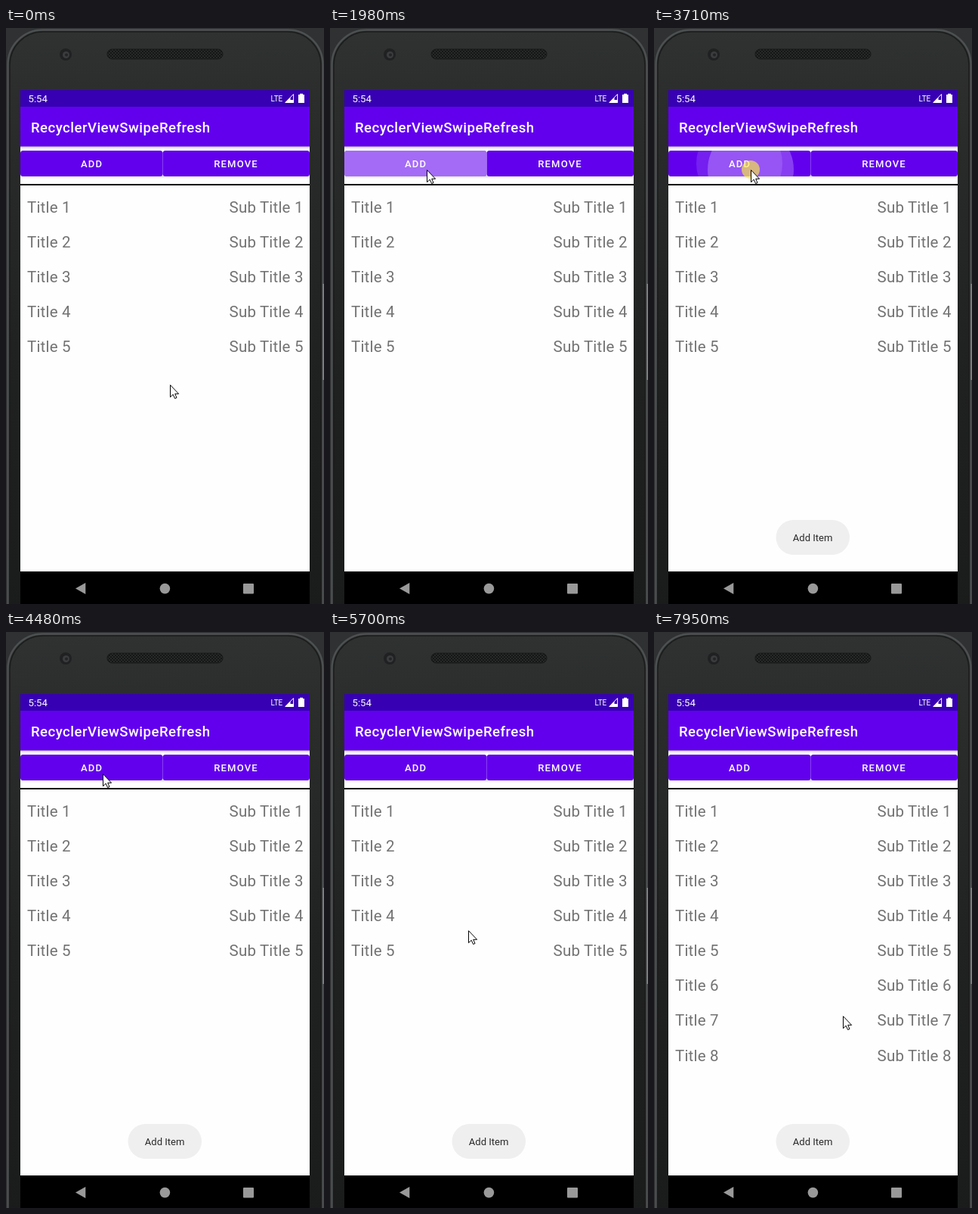
An HTML page for the animation above (8 s loop, 421 px wide and 761 px high).

```html
<!DOCTYPE html>
<html lang="en">
<head>
<meta charset="utf-8">
<title>Swipe refresh demo</title>
<style>
  html, body { margin: 0; width: 100%; height: 100%; overflow: hidden; background: #2f3133; }
  svg { display: block; width: 421px; height: 761px; font-family: Roboto, sans-serif; }
  .row text { font-size: 20.5px; letter-spacing: .18px; fill: #737373; }
  .end { text-anchor: end; }
  .medium { font-weight: 500; fill: #fff; }
  .bar { font-size: 18.64px; letter-spacing: .44px; }
  .label { font-size: 13.05px; letter-spacing: 1.165px; }
</style>
</head>
<body>
<svg viewBox="0 0 421 761">
  <defs>
    <linearGradient id="body" x2="0" y2="1">
      <stop stop-color="#303232"/><stop offset=".12" stop-color="#2b2c2c"/>
      <stop offset=".5" stop-color="#202121"/><stop offset="1" stop-color="#191a1a"/>
    </linearGradient>
    <linearGradient id="shade" x2="0" y2="1">
      <stop stop-color="#000" stop-opacity=".24"/><stop offset="1" stop-color="#000" stop-opacity="0"/>
    </linearGradient>
    <pattern id="mesh" width="4" height="4" patternUnits="userSpaceOnUse">
      <rect width="4" height="4" fill="#151616"/>
      <circle cx="1" cy="1" r=".9" fill="#303131"/><circle cx="3" cy="3" r=".9" fill="#303131"/>
    </pattern>
    <clipPath id="addClip"><rect x="19" y="162" width="188.5" height="34" rx="3.5"/></clipPath>
    <clipPath id="listClip"><rect x="19" y="208" width="383" height="510"/></clipPath>
    <filter id="soft" x="-30%" y="-30%" width="160%" height="160%">
      <feDropShadow dx="0" dy="1" stdDeviation="1.6" flood-opacity=".28"/>
    </filter>
  </defs>

  <rect width="421" height="761" fill="#2f3133"/>
  <rect x="2.5" y="2.5" width="417" height="830" rx="46" fill="url(#body)" stroke="#4d5051" stroke-width="2.5"/>
  <rect x="5" y="5" width="412" height="830" rx="44" fill="none" stroke="#1c1d1d" stroke-width="1.5"/>
  <rect x="419.5" y="338" width="2" height="127" fill="#85888a"/>
  <rect x="134" y="28" width="153" height="13" rx="6.5" fill="url(#mesh)" stroke="#171818"/>
  <circle cx="79" cy="35" r="8" fill="#202122"/>
  <circle cx="79.5" cy="35.5" r="4.5" fill="#3a3c3d"/>
  <circle cx="80" cy="35.5" r="2" fill="#222425"/>

  <rect x="19" y="82" width="383" height="636" fill="#fefefe"/>
  <rect x="19" y="156" width="383" height="4" fill="url(#shade)"/>
  <rect x="19" y="104" width="383" height="52.5" fill="#6200ee"/>
  <rect x="19" y="82" width="383" height="22" fill="#3700b3"/>
  <text x="29.5" y="98.2" font-size="13.2" fill="#fff">5:54</text>
  <text x="350.6" y="96.8" font-size="10" fill="#fff">LTE</text>
  <path d="M369.8 98.5L380.6 87.5V98.5Z" fill="none" stroke="#fff"/>
  <path d="M369.5 98.8L376.5 91.7V98.8ZM376 95H381V98.8H376Z" fill="#fff"/>
  <path d="M389 86.8H393V88H395V99H387V88H389Z" fill="#fff"/>
  <text x="33" y="137.8" class="medium bar">RecyclerViewSwipeRefresh</text>

  <rect x="20" y="195" width="381" height="4" fill="url(#shade)" opacity=".7"/>
  <rect x="19" y="162" width="188.5" height="34" rx="3.5" fill="#6200ee"/>
  <rect x="207.5" y="162" width="194.5" height="34" rx="3.5" fill="#6200ee"/>
  <g clip-path="url(#addClip)" fill="#fff">
    <circle id="rippleLate" cx="113" cy="179"/>
    <circle id="ripple" cx="128" cy="187"/>
  </g>
  <text x="98.9" y="184" class="medium label">ADD</text>
  <text x="275.2" y="184" class="medium label">REMOVE</text>
  <rect x="19" y="206" width="383" height="2" fill="#0a0a0a"/>

  <g id="list"></g>

  <g clip-path="url(#listClip)">
    <g id="spinner">
      <circle r="19" fill="#fafafa" filter="url(#soft)"/>
      <path id="arc" d="M0 -8.2A8.2 8.2 0 1 1 -8.2 0" fill="none" stroke="#000" stroke-width="2.7"/>
    </g>
  </g>

  <g id="toast">
    <rect x="161.5" y="650" width="97.5" height="46" rx="23" fill="#efefef"/>
    <text x="183.8" y="678.2" font-size="13.05" fill="#2b2b2b">Add Item</text>
  </g>

  <rect x="19" y="718" width="383" height="43"/>
  <g fill="#999">
    <path d="M92 740.5L105.3 733V748Z"/>
    <circle cx="210.4" cy="740.6" r="6.8"/>
    <rect x="314" y="734" width="14" height="13.5" rx="1"/>
  </g>

  <circle id="press" r="12" fill="#fff03c" opacity=".63"/>
  <path id="cursor" d="M.5 .7V16.7L4.2 13.2L6.6 18.5L9 17.5L6.7 12.3H11.6Z" fill="#fff" stroke="#000"/>
</svg>
<script>
const LOOP = 8000, TICK = 68.2;
const el = id => document.getElementById(id);
const set = (id, attrs) => { for (const k in attrs) el(id).setAttribute(k, attrs[k]); };
const clamp = x => Math.max(0, Math.min(1, x));
const smooth = x => x * x * (3 - 2 * x);
const lerp = (a, b, p) => a + (b - a) * p;

// The screen updates in ticks, counted from the start of each action.
const ticks = (t, start) => Math.floor((t - start) / TICK);
const progress = (t, start, n) => clamp((ticks(t, start) + 1) / n);

// start, number of ticks, x, y
const moves = [
  [1080, 7, 128, 187],
  [5355, 6, 183, 394],
  [5970, 7, 239, 338],
  [6670, 6, 241, 560],
  [7140, 2, 241, 552],
  [7880, 2, 250, 507]
];
const clicks = [1770, 3710, 5010];
const drag = [6600, 7010];

for (let i = 1; i <= 8; i++) {
  const y = 243.8 + (i - 1) * 46.1;
  el('list').insertAdjacentHTML('beforeend',
    `<g class="row"><text x="28" y="${y}">Title ${i}</text>` +
    `<text x="393.6" y="${y}" class="end">Sub Title ${i}</text></g>`);
}
const newRows = [...el('list').children].slice(5);

function cursorAt(t) {
  let x = 217, y = 471;
  for (const [start, n, tx, ty] of moves) {
    const p = smooth(progress(t, start, n));
    x = lerp(x, tx, p);
    y = lerp(y, ty, p);
  }
  return [x, y];
}

function drawRipple(k) {
  const spread = clamp(k / 3), fade = clamp((7 - k) / 4);
  const on = k >= 0 && k < 7;
  set('ripple', { r: lerp(57, 130, spread), opacity: on ? lerp(.24, .42, spread) * fade : 0 });
  set('rippleLate', { r: lerp(57, 130, spread), opacity: on ? .12 * (1 - spread) : 0 });
}

function toastAlpha(t) {
  // Queued toasts cross-fade, which dips the combined opacity.
  const dip = start => { const p = progress(t, start, 7); return p * (1 - p); };
  return progress(t, 2043, 8) * (1 - dip(3780) - dip(5970));
}

function drawSpinner(t) {
  const pull = smooth(progress(t, 6670, 5));
  const settle = smooth(progress(t, 6940, 3));
  const scale = 1 - progress(t, 7145, 4);
  const y = lerp(lerp(188, 302, pull), 254, settle);
  set('spinner', { transform: `translate(210.3 ${y}) scale(${scale})` });
  set('arc', {
    transform: `rotate(${ticks(t, 7075) * 24})`,
    opacity: lerp(.35, 1, pull)
  });
  el('spinner').style.display = t >= 6670 && scale > 0 ? '' : 'none';
}

function render(t) {
  const [x, y] = cursorAt(t);
  set('cursor', { transform: `translate(${Math.round(x)} ${Math.round(y)})` });

  const click = clicks.filter(c => c <= t).pop();
  const k = click === undefined ? -1 : ticks(t, click);
  drawRipple(k);

  const pressed = (k >= 0 && k < 2) || (t >= drag[0] && t < drag[1]);
  set('press', { cx: x, cy: y, visibility: pressed ? 'visible' : 'hidden' });

  set('toast', { opacity: toastAlpha(t) });
  drawSpinner(t);
  const shown = progress(t, 7145, 3);
  newRows.forEach(row => row.setAttribute('opacity', shown));
}

const begin = performance.now();
function frame() {
  render((performance.now() - begin) % LOOP);
  requestAnimationFrame(frame);
}
frame();
</script>
</body>
</html>
```
